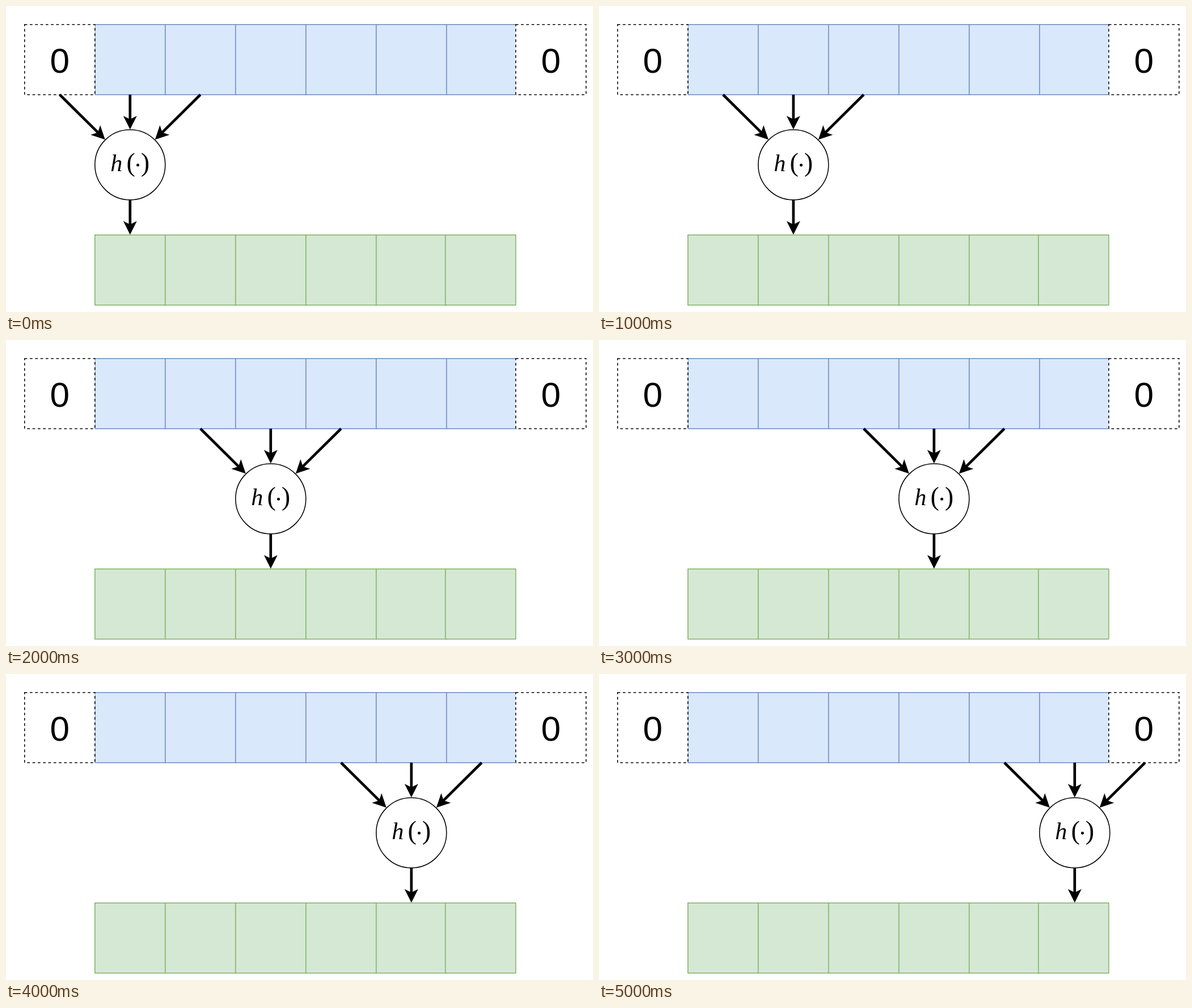
These frames come from a looping animation (1035 px wide and 541 px high, 6 s). An HTML page with a canvas:

```html
<!DOCTYPE html>
<html lang="en">
<head>
<meta charset="utf-8">
<title>Sliding window</title>
<style>
  html, body { margin: 0; width: 100%; height: 100%; overflow: hidden; background: #fff; }
  canvas { display: block; }
</style>
</head>
<body>
<canvas id="stage" width="1035" height="541"></canvas>
<script>
const ctx = document.getElementById('stage').getContext('2d');
const CELL = 124, LEFT = 32.75, TOP = 32.75, THIN = 1.55, THICK = 4.65;
const OUT_TOP = TOP + 3 * CELL;
const STEPS = 6, STEP_MS = 1000;

function box(x, y, fill, stroke, dash = []) {
  ctx.lineWidth = THIN;
  ctx.fillStyle = fill;
  ctx.strokeStyle = stroke;
  ctx.setLineDash(dash);
  ctx.fillRect(x, y, CELL, CELL);
  ctx.strokeRect(x, y, CELL, CELL);
  ctx.setLineDash([]);
}

function label(text, x, y, font, align = 'left') {
  ctx.font = font;
  ctx.textAlign = align;
  ctx.fillStyle = '#000';
  ctx.fillText(text, x, y);
}

function padding(x) {
  box(x, TOP, '#fff', '#000', [THICK, THICK]);
  label('0', x + CELL / 2, TOP + 85, '62px "Liberation Sans", Arial, sans-serif', 'center');
}

function arrow(x1, y1, x2, y2) {
  const length = Math.hypot(x2 - x1, y2 - y1);
  ctx.save();
  ctx.translate(x2, y2);
  ctx.rotate(Math.atan2(y2 - y1, x2 - x1));
  ctx.fillStyle = '#000';
  ctx.fillRect(-length, -THICK / 2, length - 16, THICK);
  ctx.beginPath();
  ctx.moveTo(0, 0);
  ctx.lineTo(-24, 12);
  ctx.lineTo(-18, 0);
  ctx.lineTo(-24, -12);
  ctx.fill();
  ctx.restore();
}

function rows() {
  for (let i = 1; i <= STEPS; i++) {
    // The last output cell overlaps its neighbour slightly.
    const shift = i === STEPS ? 2 : 0;
    box(LEFT + i * CELL, TOP, '#dae8fc', '#6c8ebf');
    box(LEFT + i * CELL - shift, OUT_TOP, '#d5e8d4', '#82b366');
  }
  padding(LEFT);
  padding(LEFT + 7 * CELL - 2);
}

function kernel(x) {
  const radius = CELL / 2, y = TOP + 2 * CELL, from = TOP + CELL;
  ctx.strokeStyle = '#000';
  ctx.lineWidth = THIN;
  ctx.beginPath();
  ctx.arc(x, y, radius, 0, 2 * Math.PI);
  ctx.stroke();

  arrow(x - CELL, from, x - 44, y - 44.6);
  arrow(x, from, x, y - radius - 0.6);
  arrow(x + CELL, from, x + 44, y - 44.6);
  arrow(x, y + radius, x, OUT_TOP - 0.6);

  const serif = '"Liberation Serif", "Times New Roman", serif';
  label('h', x - 34.5, y + 11.5, `italic 42px ${serif}`);
  label('(', x - 6.2, y + 11.5, `46px ${serif}`);
  label(')', x + 19, y + 11.5, `46px ${serif}`);
  ctx.beginPath();
  ctx.arc(x + 13.7, y + 0.6, 2.5, 0, 2 * Math.PI);
  ctx.fill();
}

function draw() {
  const step = Math.floor(performance.now() / STEP_MS) % STEPS;
  ctx.fillStyle = '#fff';
  ctx.fillRect(0, 0, 1035, 541);
  rows();
  kernel(LEFT + (step + 1.5) * CELL);
  requestAnimationFrame(draw);
}
draw();
</script>
</body>
</html>
```
